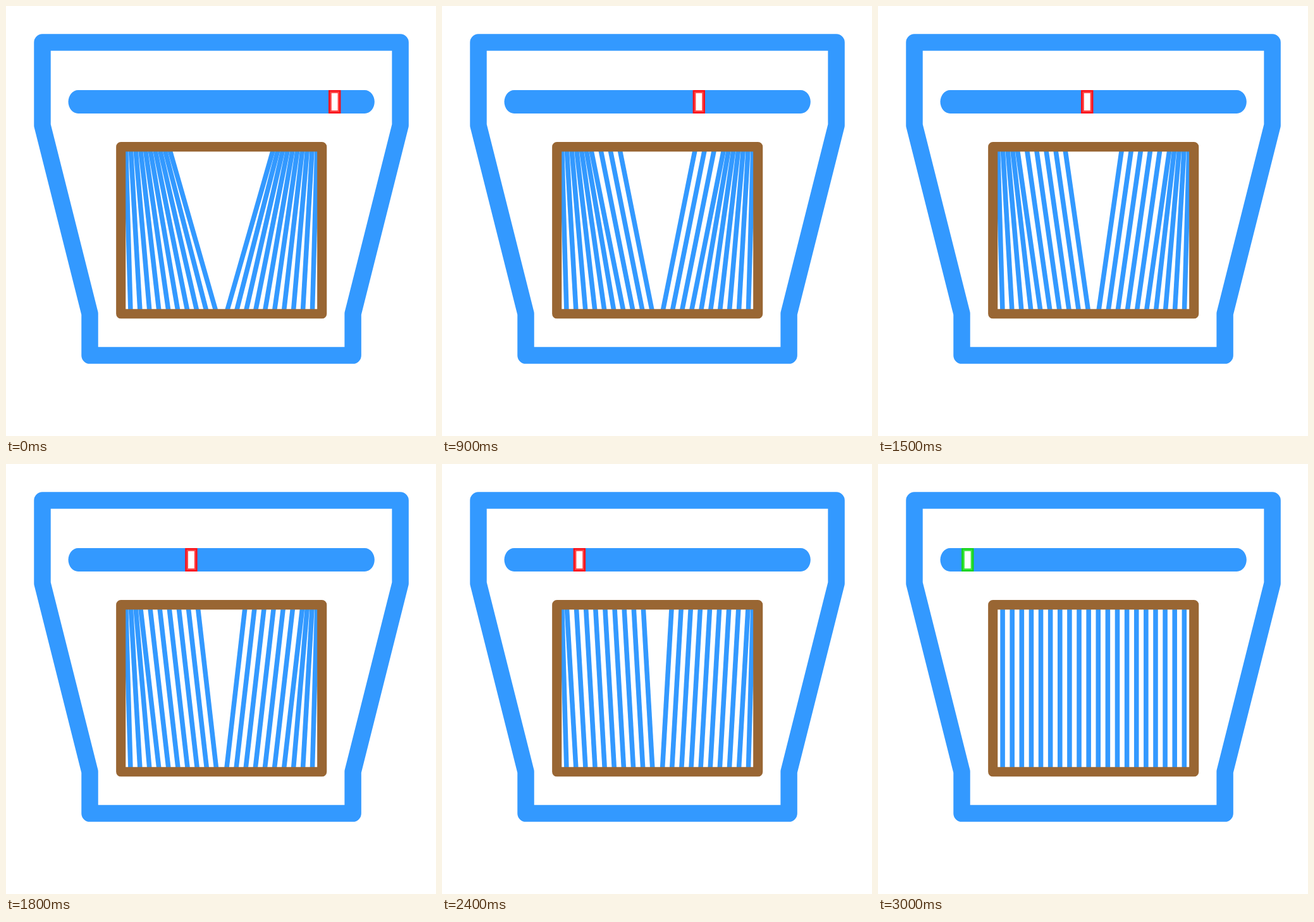
Recreate the animation shown at these times as an HTML page with a canvas. Size 680x680 px, loop 3300 ms.

```html
<!DOCTYPE html>
<html>
<head>
<meta charset="utf-8">
<style>
  html, body { margin: 0; width: 100%; height: 100%; overflow: hidden; background: #fff; }
  canvas { display: block; }
</style>
</head>
<body>
<canvas id="stage" width="680" height="680"></canvas>
<script>
const ctx = document.getElementById('stage').getContext('2d');
const BLUE = '#3399ff', BROWN = '#996633';
const STEP_MS = 300, STEPS = 11;
const CM = 37.795;
const MID = 340.7, TOP = 222.6, BOTTOM = 486.8;

function strokePath(points, width, color, closed) {
  ctx.beginPath();
  points.forEach(([x, y]) => ctx.lineTo(x, y));
  if (closed) ctx.closePath();
  ctx.lineWidth = width;
  ctx.strokeStyle = color;
  ctx.stroke();
}

function fillBox(x, y, w, h, color) {
  ctx.fillStyle = color;
  ctx.fillRect(x, y, w, h);
}

function drawHousing() {
  const right = [[623.6, 57.5], [623.6, 188.8], [548.6, 486.5], [548.6, 552.6]];
  const left = right.map(([x, y]) => [2 * MID - x - 0.3, y]).reverse();
  strokePath([...right, ...left], 0.7 * CM, BLUE, true);
}

function drawTrack() {
  const x = 98.5, y = 133, w = 484.3, h = 37, rx = 15.5, ry = h / 2;
  ctx.beginPath();
  ctx.ellipse(x + rx, y + ry, rx, ry, 0, Math.PI / 2, Math.PI * 1.5);
  ctx.ellipse(x + w - rx, y + ry, rx, ry, 0, -Math.PI / 2, Math.PI / 2);
  ctx.fillStyle = BLUE;
  ctx.fill();
}

function drawKnob(step) {
  const [edge, rim] = step === STEPS - 1 ? ['#14d21e', '#3de63d'] : ['#f8101a', '#ff4444'];
  const x = 510 - step * CM, y = 133;
  fillBox(x, y, 19.4, 37, edge);
  fillBox(x + 2.4, y + 2.4, 14.6, 32.2, rim);
  fillBox(x + 4.8, y + 4.8, 9.8, 27.4, '#fff');
}

// Slats lean outwards in parallel until they bunch up against the frame.
function drawSlats(step) {
  const lean = STEPS - 1 - step;
  for (let i = 0; i < 10; i++) {
    const offset = (9.5 - i) * 0.4 * CM;
    const shift = Math.min(lean, i + 1) * 0.2 * CM;
    for (const side of [-1, 1]) {
      strokePath([
        [MID + side * offset, BOTTOM],
        [MID + side * (offset + shift), TOP]
      ], 0.2 * CM, BLUE);
    }
  }
}

function drawFrame() {
  const l = 181.7, r = 499.7;
  strokePath([[l, TOP], [r, TOP], [r, BOTTOM], [l, BOTTOM]], 0.4 * CM, BROWN, true);
}

function render(now) {
  const step = Math.floor(now / STEP_MS) % STEPS;
  fillBox(0, 0, 680, 680, '#fff');
  ctx.lineJoin = 'round';
  drawHousing();
  drawTrack();
  drawKnob(step);
  drawSlats(step);
  drawFrame();
}

let start;
function tick(now) {
  start ??= now;
  render(now - start);
  requestAnimationFrame(tick);
}
render(0);
requestAnimationFrame(tick);
</script>
</body>
</html>
```
